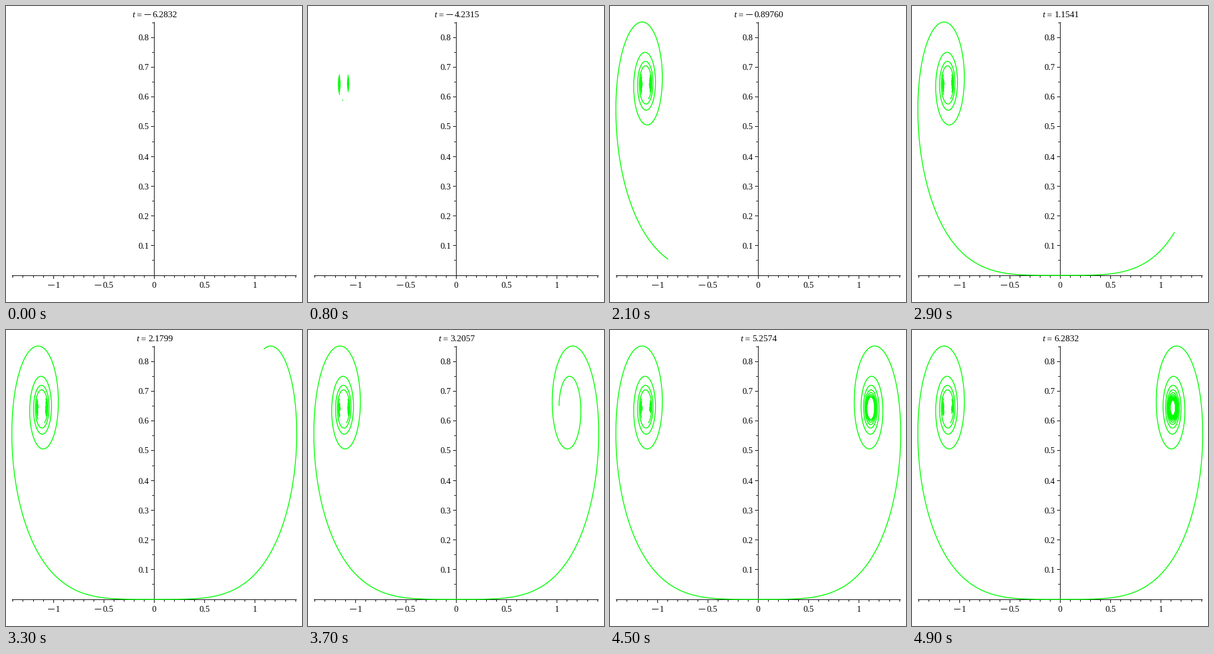
A matplotlib script for the animation above (5000 ms loop, 500 by 500 pixels).

```python
import numpy as np
import matplotlib.pyplot as plt
from matplotlib.animation import FuncAnimation

SIZE, DPI = 500, 100
PX = 72 / DPI                           # points per pixel
FRAMES, INTERVAL = 50, 100
T0 = -2 * np.pi
WHOLE_FROM = -4.2                       # the curve is unbroken after this t
X0, Y0, XS, YS = 250.5, 455.0, 170.4, 502.1
TICK_FONT, TITLE_FONT = 14.4, 15.2      # pixels
GREEN = "#00ff00"

# Curve: x = integral of cos(s^3/3), y = integral of sin(s^3/3)
s = np.linspace(0, 2 * np.pi, 40001)


def integral(values):
    steps = (values[1:] + values[:-1]) / 2 * (s[1] - s[0])
    return np.concatenate([[0], np.cumsum(steps)])


CX = integral(np.cos(s**3 / 3))
CY = integral(np.sin(s**3 / 3))


def curve(t):
    x = np.sign(t) * np.interp(np.abs(t), s, CX)
    y = np.interp(np.abs(t), s, CY)
    return X0 + XS * x, Y0 - YS * y


def visible_curve(t_end):
    """The tight turns on the left only show their steep parts."""
    left = np.linspace(T0, t_end, 800)
    if t_end > WHOLE_FROM:
        left = left[left < WHOLE_FROM]
    x, y = curve(left)
    steepness = 0.72 + 0.25 * (WHOLE_FROM - left)
    hidden = (np.abs(np.sin(left**3 / 3)) < steepness) & (left < t_end - 0.012)
    x[hidden] = np.nan
    if t_end > WHOLE_FROM:
        count = max(2, int((t_end - WHOLE_FROM) / 0.01))
        rx, ry = curve(np.linspace(WHOLE_FROM, t_end, count))
        x, y = np.append(x, rx), np.append(y, ry)
    return x, y


plt.rcParams["font.family"] = "Liberation Serif"
fig = plt.figure(figsize=(SIZE / DPI, SIZE / DPI), dpi=DPI, facecolor="white")
ax = fig.add_axes([0, 0, 1, 1])
ax.set_xlim(0, SIZE)
ax.set_ylim(SIZE, 0)
ax.axis("off")


def stroke(xs, ys):
    return ax.plot(xs, ys, color="black", lw=PX, solid_capstyle="butt",
                   snap=False)[0]


def label(x, y, text, ha="left", size=TICK_FONT, **style):
    return ax.text(x, y, text, fontsize=size * PX, ha=ha, va="baseline", **style)


# Axes
stroke([10, 491], [455.5, 455.5])
stroke([250.5, 250.5], [27, 456])
for k in range(-14, 15):
    px = np.floor(X0 + XS * k / 10) + 0.5
    stroke([px, px], [455, 461 if k % 5 == 0 else 459])
for k in range(1, 18):
    py = np.floor(Y0 - YS * k / 20) + 0.5
    stroke([245 if k % 2 == 0 else 247, 251], [py, py])
    if k % 2 == 0:
        label(241.5, py + 5, f"{k / 20:.1f}", "right")

label(250.5, 476, "0", "center")
label(335.5, 476, "0.5", "center")
label(420.5, 476, "1", "center")
label(173, 476, "0.5", "center")
label(87, 476, "1", "center")
stroke([150, 161], [471.5, 471.5])
stroke([71, 82], [471.5, 471.5])

# Title parts
t_sign = label(0, 19, "t", size=TITLE_FONT, style="italic")
equals = label(0, 19, "=", size=TITLE_FONT)
minus = stroke([0, 0], [14.5, 14.5])
value = label(0, 19, "", "right", size=TITLE_FONT)

line, = ax.plot([], [], color=GREEN, lw=1.5 * PX, zorder=5,
                solid_capstyle="butt", solid_joinstyle="round")


def update(i):
    t = T0 + i * 4 * np.pi / (FRAMES - 1)
    number = f"{abs(t):#.5g}"
    number_width = TITLE_FONT * (0.5 * (len(number) - 1) + 0.25)
    width = 20.5 + number_width + (14 if t < 0 else 0)
    start = 251 - width / 2
    t_sign.set_x(start)
    equals.set_x(start + 7.5)
    minus.set_xdata([start + 21, start + 32])
    minus.set_visible(t < 0)
    value.set_x(start + width)
    value.set_text(number)
    line.set_data(*(visible_curve(t) if i else ([], [])))
    return t_sign, equals, minus, value, line


anim = FuncAnimation(fig, update, frames=FRAMES, interval=INTERVAL,
                     repeat=True, repeat_delay=0)
plt.show()
```
